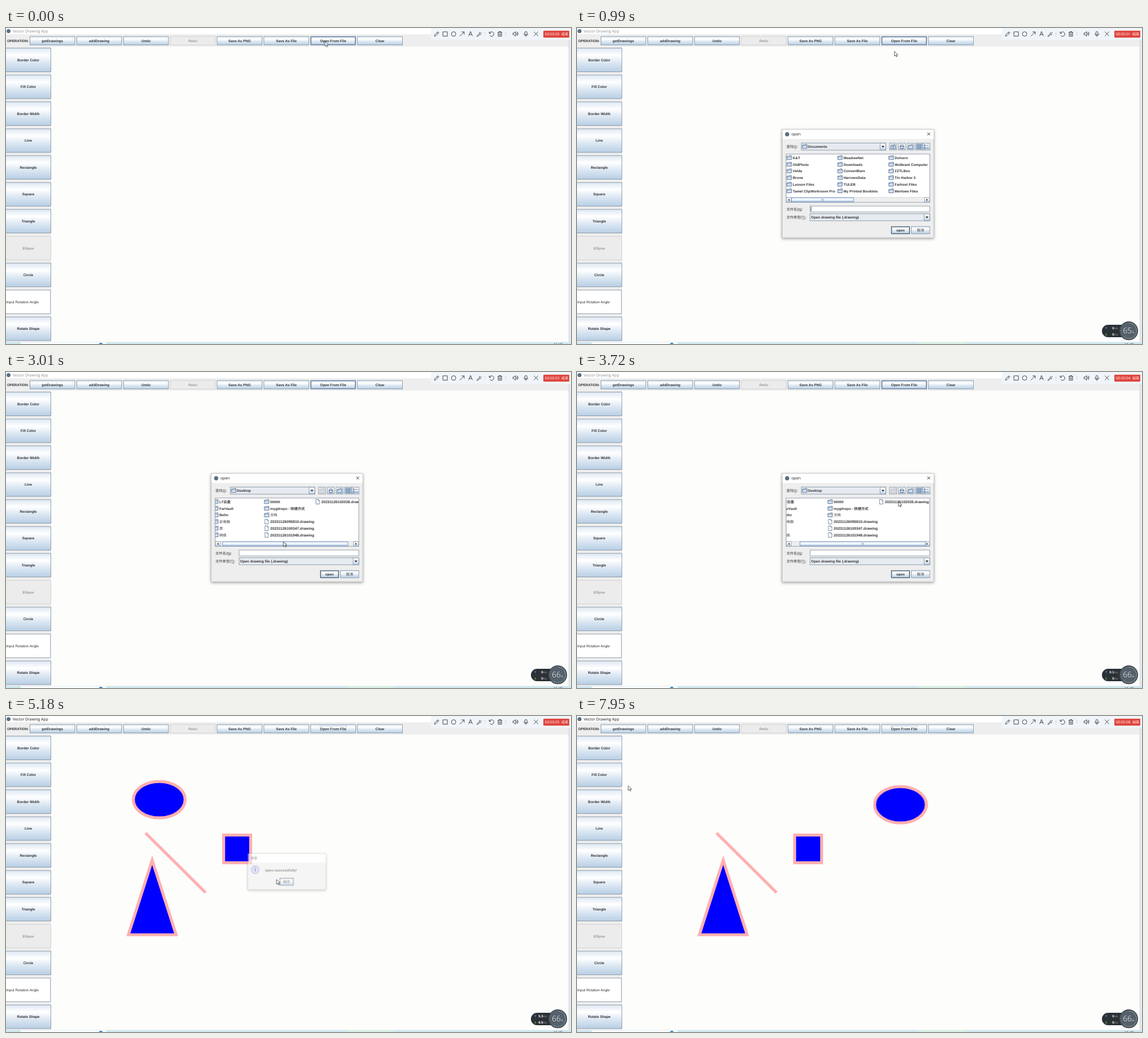
An HTML page that plays this animation: 1001x559 px, repeating every 8000 ms.

```html
<!DOCTYPE html>
<html lang="en">
<head>
<meta charset="utf-8">
<title>Vector Drawing App</title>
<style>
  html, body { margin: 0; width: 100%; height: 100%; overflow: hidden; background: #fdfdfc; }
  #stage { display: block; width: 1001px; height: 559px; }
  text { font-family: 'Liberation Sans', 'Noto Sans CJK SC', 'Noto Sans CJK', sans-serif; text-rendering: geometricPrecision; white-space: pre; }
  .system { font-family: 'Open Sans', 'Noto Sans CJK SC', 'Noto Sans CJK', sans-serif; }
</style>
</head>
<body>
<svg id="stage" viewBox="0 0 1001 559" xmlns="http://www.w3.org/2000/svg">
  <defs>
    <linearGradient id="ocean" x2="0" y2="1">
      <stop offset="0" stop-color="#dde8f3"/><stop offset=".3" stop-color="#fff"/>
      <stop offset=".6" stop-color="#dde8f3"/><stop offset="1" stop-color="#b8cfe5"/>
    </linearGradient>
    <filter id="shadow" x="-10%" y="-10%" width="120%" height="125%">
      <feDropShadow dx="0" dy="1.5" stdDeviation="2.6" flood-color="#000" flood-opacity=".4"/>
    </filter>
  </defs>
</svg>
<script>
const LOOP = 8000;
const stage = document.getElementById('stage');
const OCEAN = 'url(#ocean)', EDGE = '#7a8a99', INK = '#333', PANEL = '#eee', SELECT = '#b8cfe5';

function add(parent, tag, attrs, content) {
  const node = document.createElementNS('http://www.w3.org/2000/svg', tag);
  for (const key in attrs) node.setAttribute(key, attrs[key]);
  if (content !== undefined) node.textContent = content;
  parent.append(node);
  return node;
}
const group = parent => add(parent, 'g', {});
const box = (parent, x, y, width, height, fill, stroke = 'none', extra = {}) =>
  add(parent, 'rect', { x, y, width, height, fill, stroke, 'stroke-width': .8, ...extra });
const path = (parent, d, stroke = INK, extra = {}) =>
  add(parent, 'path', { d, stroke, fill: 'none', 'stroke-width': .9, ...extra });
const dot = (parent, cx, cy, r, fill, extra = {}) => add(parent, 'circle', { cx, cy, r, fill, ...extra });
const label = (parent, x, y, content, extra = {}) =>
  add(parent, 'text', { x, y, 'font-size': 6.3, 'font-weight': 700, fill: INK, ...extra }, content);
const plain = (parent, x, y, content, extra = {}) =>
  label(parent, x, y, content, { 'font-weight': 400, ...extra });
const system = (parent, x, y, content, extra = {}) =>
  plain(parent, x, y, content, { class: 'system', 'font-size': 6.8, ...extra });

// steps: [ms, value] pairs, the first at 0; the last value holds to the loop's end.
function play(node, property, steps, easing = 'step-end') {
  const frames = steps.map(([ms, value]) => ({ offset: ms / LOOP, [property]: value, easing }));
  frames.push({ offset: 1, [property]: steps.at(-1)[1] });
  node.animate(frames, { duration: LOOP, iterations: Infinity });
  return node;
}
const show = (node, from, to = LOOP) =>
  play(node, 'opacity', [...(from ? [[0, 0]] : []), [from, 1], ...(to < LOOP ? [[to, 0]] : [])]);
const move = (node, steps) =>
  play(node, 'transform', steps.map(([ms, x, y = 0]) => [ms, `translate(${x}px,${y}px)`]), 'linear');
// values: [ms, content] pairs, each shown until the next one starts.
function swap(values, draw) {
  values.forEach(([ms, content], i) => show(draw(content), ms, values[i + 1]?.[0]));
}

function button(parent, x, y, w, h, content, { disabled, ...extra } = {}) {
  box(parent, x, y, w, h, disabled ? '#ececec' : OCEAN, disabled ? '#b4b4b4' : EDGE,
    disabled ? { 'stroke-dasharray': '1 .6' } : {});
  label(parent, x + w / 2, y + h / 2 + 2.2, content,
    { 'text-anchor': 'middle', fill: disabled ? '#999' : INK, ...extra });
}
function folder(parent, x, y) {
  path(parent, `M${x} ${y + 6.5}v-6h3l1-1h4v7z`, '#52698c', { fill: '#d5e2f1' });
  path(parent, `M${x} ${y + 1.7}h8`, '#52698c', { 'stroke-width': .6 });
}
function sheet(parent, x, y) {
  path(parent, `M${x + 1} ${y - 1}h4l2 2v6.3h-6zM${x + 5} ${y - 1}v2h2`, '#52698c', { fill: '#fff', 'stroke-width': .8 });
}

function drawWindow() {
  box(stage, 0, 0, 1001, 559, '#fdfdfc');
  box(stage, 0, 0, 1001, 11, '#fff');
  box(stage, 0, 11, 1001, 22, PANEL);
  box(stage, 0, 33, 80, 523, PANEL);
  box(stage, 997, 21, 4, 535, '#e9edf0');
  path(stage, 'M997.5 21V556', '#b9c6d2', { 'stroke-width': .7 });
  dot(stage, 4.5, 5.5, 3.5, '#5a6f86');
  swap([[0, '#8c8c8c'], [5130, '#111']], fill => system(stage, 12, 8.2, 'Vector Drawing App', { fill }));

  label(stage, 2, 25, 'OPERATION:', { 'font-size': 6.2 });
  ['getDrawings', 'addDrawing', 'Undo', 'Redo', 'Save As PNG', 'Save As File', 'Open From File', 'Clear']
    .forEach((name, i) => button(stage, 42.4 + i * 82.9, 15, 79.6, 15, name, { disabled: name === 'Redo' }));
  show(box(stage, 540.4, 15.6, 78.4, 13.8, 'none', '#6c87ad', { 'stroke-width': 1.4 }), 0, 5130);
  show(box(stage, 556.5, 17.5, 46.5, 9.5, 'none', '#a3b8cc', { 'stroke-width': .6 }), 5130);

  ['Border Color', 'Fill Color', 'Border Width', 'Line', 'Rectangle', 'Square', 'Triangle', 'Ellipse', 'Circle', '', 'Rotate Shape']
    .forEach((name, i) => {
      const y = 35.6 + i * 47.55;
      if (name) return button(stage, -.5, y, 80, 41.8, name, { disabled: name === 'Ellipse' });
      box(stage, -.5, y, 79.3, 41.8, '#fff', EDGE);
      plain(stage, .5, y + 23.2, 'Input Rotation Angle', { 'font-size': 6.4 });
    });

  box(stage, 0, 555.5, 1001, 3.5, '#cfe7ee');
  box(stage, 26, 556, 152, 3, '#fbfdfd');
  show(box(stage, 604, 556, 85, 3, '#d6efe3'), 400);
  dot(stage, 168, 560, 3.2, '#2b86d9');
  system(stage, 970, 562, '11:45', { 'font-size': 6.5 });
}

function drawShapes() {
  const shapes = add(stage, 'g', { fill: '#00f', stroke: '#ffafaf', 'stroke-width': 5.2 });
  add(shapes, 'path', { d: 'M247.2 207 353.5 312.3', fill: 'none' });
  add(shapes, 'rect', { x: 385.6, y: 210.6, width: 47.8, height: 49 });
  add(shapes, 'path', { d: 'M259 255 301.4 387H216.8z' });
  const ellipse = add(shapes, 'ellipse', { cx: 271.5, cy: 148, rx: 45.8, ry: 32.2 });
  move(ellipse, [[0, 0, 0], [5750, 0, 0], [6250, 301.5, 9]]);
  show(shapes, 4190);
}

function drawRecorder() {
  box(stage, 753, 0, 248, 21, '#f0f5fa');
  [
    'M759 14.5l.7-2.6 5.4-5.2 1.8 1.8-5.3 5.3zM763.8 8l1.8 1.8',
    'M774 6.8h8v7.6h-8z',
    'M804 14.5l7.6-7.6M807 6.9h4.7v4.7',
    'M819.6 14.2l3.4-8 3.4 8M820.8 11.4h4.4',
    'M834 14.4l4.8-4.8 1.2 1.2-4.8 4.4zM838.5 7l1 2M842.5 8l-2 1.2M842 12l-1.6-.6',
    'M856.2 6.5v3h3M856.6 9.3a4 4 0 1 1 .6 4',
    'M871 7.8h8M873.4 7.6V6.3h3.2v1.3M872 8v6.6h6V8M874 9.7v3.4M876 9.7v3.4',
    'M898.3 8.8h2l2.6-2.4v8l-2.6-2.4h-2zM904.6 8.3q1.5 2 0 4M906 6.8q2.7 3.5 0 7',
    'M919.3 8a1.8 1.8 0 0 1 3.6 0v2.3a1.8 1.8 0 0 1-3.6 0zM917.5 10.2q.5 3.2 3.6 3.2t3.6-3.2M921.1 13.4v2',
    'M935.2 6.6l7.6 7.6M942.8 6.6l-7.6 7.6'
  ].forEach(d => path(stage, d));
  dot(stage, 793, 10.6, 4, 'none', { stroke: INK, 'stroke-width': .9 });
  path(stage, 'M848.5 7v7M885.5 7v7', '#c3ccd4', { 'stroke-width': .7 });

  box(stage, 952, 4.8, 46, 12.2, '#df453d', 'none', { rx: 1.5 });
  const seconds = Array.from({ length: 9 }, (_, s) => [s && s * 1000 - 670, `00:00:0${s}`]);
  swap(seconds, time => system(stage, 954.7, 13.2, time, { fill: '#fff', 'font-size': 6.5 }));
  system(stage, 984, 13.2, '结束', { fill: '#fff', 'font-size': 6.1 });
}

function drawSpeedBall() {
  const ball = group(stage);
  box(ball, 930, 525, 50, 22, '#2c3136', 'none', { rx: 11 });
  path(ball, 'M937.5 533v-4M936 530.5l1.5-1.5 1.5 1.5', '#4a9be0', { 'stroke-width': .8 });
  path(ball, 'M937.5 540v4M936 542.5l1.5 1.5 1.5-1.5', '#55b96a', { 'stroke-width': .8 });
  const rate = (y, values) => {
    swap(values, value => label(ball, 951.6, y, value, { fill: '#fff', 'font-size': 6, 'text-anchor': 'end' }));
    plain(ball, 952, y, 'K/s', { fill: '#a5abb0', 'font-size': 4.6 });
  };
  rate(532.6, [[0, '0'], [3450, '0.1'], [4450, '5.3'], [5450, '0.9'], [7450, '0']]);
  rate(544.2, [[0, '0'], [4450, '6.6'], [5450, '1'], [7450, '0']]);
  dot(ball, 977.5, 535.7, 16, '#55606b', { stroke: '#3f474e', 'stroke-width': 1.2 });
  path(ball, 'M977.5 522a13.7 13.7 0 1 1-9 24', '#7f9a92', { 'stroke-width': 1 });
  swap([[0, '65'], [1450, '66']], value =>
    system(ball, 967.3, 540.4, value, { fill: '#fff', 'font-size': 13.6, 'font-weight': 300 }));
  system(ball, 983.3, 540.4, '%', { fill: '#dde2e6', 'font-size': 4.8 });
  show(ball, 450);
}

function drawFrame(parent, x, y, w, h, barHeight) {
  box(parent, x, y, w, h, PANEL, '#a9a9a9', { filter: 'url(#shadow)', 'stroke-width': .6 });
  box(parent, x + .3, y + .3, w - .6, barHeight, '#fff');
}
function dropArrow(parent, x, y, h) {
  box(parent, x, y, 10, h, OCEAN, EDGE);
  path(parent, `M${x + 2.3} ${y + h / 2 - 1.3}h5.4l-2.7 3z`, 'none', { fill: '#222' });
}

// Columns of six rows; names ending in ".drawing" get a sheet icon.
function fileGrid(parent, names) {
  const grid = group(parent);
  names.forEach((name, i) => {
    const x = [372, 462, 552.5][Math.floor(i / 6)], y = 226.3 + (i % 6) * 11.75;
    const isDrawing = name.endsWith('.drawing');
    (isDrawing ? sheet : folder)(grid, x, y);
    const cjkOnly = /^[^\x00-\x7f]+$/.test(name);
    label(grid, x + 10.3, y + 5.6, name, { 'font-size': isDrawing ? 6.6 : 6.3, 'font-weight': cjkOnly ? 400 : 700 });
  });
  return grid;
}

function drawChooser() {
  const OPENED = 500, DESKTOP = 2450, PICKED = 3810;
  const dialog = group(stage);
  drawFrame(dialog, 363.5, 179.5, 268.5, 191.5, 16.5);
  dot(dialog, 372.3, 188, 3.7, '#5a6f86');
  system(dialog, 380, 190.3, 'open', { fill: '#111' });
  path(dialog, 'M620.6 185l5 5M625.6 185l-5 5', '#222');

  plain(dialog, 371, 212.3, '查找(I):');
  box(dialog, 397.5, 203.5, 149.5, 12.5, '#e6ebf1', EDGE);
  folder(dialog, 399.3, 206.5);
  dropArrow(dialog, 537, 203.5, 12.5);
  swap([[0, 'Documents'], [DESKTOP, 'Desktop']], name => label(dialog, 409, 212.2, name));

  const tool = (x, w, fill) => box(dialog, x, 203.8, w, 12, fill, EDGE);
  [553.7, 569.3, 584.8].forEach(x => tool(x, 12.4, OCEAN));
  show(tool(569.3, 12.4, '#a9c2dd'), 2150, 2700);
  tool(600, 12.4, SELECT);
  tool(612.8, 12.4, OCEAN);
  folder(dialog, 556, 206.8);
  path(dialog, 'M560 212.5v-3M558.8 210.4l1.2-1.2 1.2 1.2', INK, { 'stroke-width': .6 });
  path(dialog, 'M572 209.5l1-2.4h5l1 2.4zM573 209.5v4h5v-4', '#3e5a80');
  folder(dialog, 587, 206.8);
  path(dialog, 'M602.5 206.5h3v2.6h-3zM607 206.5h3v2.6h-3zM602.5 211h3v2.6h-3zM607 211h3v2.6h-3z', '#3e5a80', { 'stroke-width': .7 });
  path(dialog, 'M615 206.5h2v2.4h-2zM615 211h2v2.4h-2zM618.5 207.8h5M618.5 212.3h5', '#3e5a80', { 'stroke-width': .8 });
  show(box(dialog, 553.7, 203.8, 12.4, 12, '#e4e4e4', '#aaa', { 'fill-opacity': .7 }), DESKTOP);

  box(dialog, 370.5, 223, 254.5, 85.3, '#fff', EDGE);
  const list = add(dialog, 'svg', { x: 371, y: 223.5, width: 253.5, height: 76, viewBox: '371 223.5 253.5 76' });
  show(fileGrid(list, [
    'K&T', 'OldPhoto', 'Velda', 'Brone', 'Lesson Files', 'Tamel ClipWorkroom Pro',
    'MeadowNet', 'Downloads', 'ConvertBarn', 'HarrowsData', 'TULEB', 'My Printed Booklets',
    'Dolvern', 'Wolbrant Computer', 'ZZTLBox', 'Tin Harbor 3', 'Farhost Files', 'Merlowe Files'
  ]), 0, DESKTOP);

  const desktop = group(list), scrolled = group(desktop);
  show(box(scrolled, 561.8, 224.3, 85, 11, SELECT), PICKED);
  fileGrid(scrolled, [
    'LT云盘', 'FarVault', 'Belto', '此电脑', '库', '网络',
    '00000', 'mygitrepo - 快捷方式', '文档', '20231126095810.drawing', '20231126100347.drawing', '20231126101948.drawing',
    '20231126102028.drawing'
  ]);
  move(scrolled, [[0, 0], [2950, 0], [3200, -17.5]]);
  show(desktop, DESKTOP);

  box(dialog, 370.9, 299.8, 253.7, 8.2, '#eee', '#b9c3cd', { 'stroke-width': .6 });
  box(dialog, 371, 300, 8.5, 8, OCEAN, EDGE, { 'stroke-width': .6 });
  box(dialog, 615.8, 300, 8.5, 8, OCEAN, EDGE, { 'stroke-width': .6 });
  path(dialog, 'M376.5 302v4l-2.4-2zM619 302v4l2.4-2z', 'none', { fill: '#222' });
  const thumb = width => {
    const node = group(dialog), mid = 380 + width / 2;
    box(node, 380, 300.2, width, 7.5, OCEAN, '#6382bf');
    path(node, `M${mid - 1.5} 302.3v3.5M${mid} 302.3v3.5M${mid + 1.5} 302.3v3.5`, '#6382bf', { 'stroke-width': .6 });
    return node;
  };
  show(thumb(110), 0, DESKTOP);
  const wide = group(dialog);
  move(wide.appendChild(thumb(222)), [[0, 0], [2950, 0], [3200, 15]]);
  show(wide, DESKTOP);

  plain(dialog, 371, 322.6, '文件名(N):');
  plain(dialog, 371, 337.3, '文件类型(T):');
  path(dialog, 'M393 323.6h4.5M399.5 338.3h4.5M386 213.3h2', INK, { 'stroke-width': .5 });
  box(dialog, 413, 315, 212, 10.3, '#fff', EDGE);
  play(path(dialog, 'M414.7 316.2v8', '#222', { 'stroke-width': .8 }), 'opacity', [[0, 1], [1050, 0], [1550, 1], [2050, 0]]);
  show(plain(dialog, 415, 322.5, '20231126102028.drawing'), PICKED);
  box(dialog, 413, 328.4, 212, 12.6, '#e6ebf1', EDGE);
  label(dialog, 414.8, 337.1, 'Open drawing file (.drawing)');
  dropArrow(dialog, 615, 328.4, 12.6);
  button(dialog, 557, 351.2, 32.4, 12.8, 'open');
  box(dialog, 557.4, 351.6, 31.6, 12, 'none', '#54677c', { 'stroke-width': 1.3 });
  button(dialog, 592.5, 351.2, 32.5, 12.8, '取消', { 'font-weight': 400 });

  play(dialog, 'opacity', [[0, 0], [OPENED, 0], [OPENED + 140, 1], [4050, 1], [4180, 0]], 'linear');
}

function drawMessage() {
  const dialog = group(stage);
  drawFrame(dialog, 428.7, 243.5, 138, 63.5, 15.5);
  plain(dialog, 433, 253.6, '消息', { 'font-size': 6.2 });
  dot(dialog, 441.5, 271.8, 7, '#c9c9f2', { stroke: '#6a6ab0', 'stroke-width': .9 });
  label(dialog, 441.5, 275.3, 'i', { 'font-size': 10, 'text-anchor': 'middle', fill: '#3c3c8c' });
  label(dialog, 458.8, 275.2, 'open successfully!', { 'font-size': 6.3 });
  button(dialog, 485, 286.8, 24.3, 12.6, '确定', { 'font-weight': 400 });
  box(dialog, 485.4, 287.2, 23.5, 11.8, 'none', '#54677c', { 'stroke-width': 1.2 });
  dialog.style.transformOrigin = '497.5px 275px';
  play(dialog, 'opacity', [[0, 0], [4250, 0], [4380, 1], [5120, 1], [5245, 0]], 'linear');
  play(dialog, 'transform', [[0, 'scale(1.03)'], [5120, 'scale(1.03)'], [5245, 'scale(.97)']], 'linear');
}

function drawCursor() {
  const cursor = path(stage, 'M.4.4v8.3l2-1.8 1.4 3 1.4-.6-1.3-2.9h2.7z', '#222', { fill: '#fff', 'stroke-width': .7 });
  move(cursor, [
    [0, 564.5, 23.5], [240, 564.5, 23.5], [700, 562, 41], [1080, 562, 41], [1900, 574, 212],
    [2310, 570.8, 217.5], [2730, 486, 300], [2920, 486, 300], [3200, 501, 300], [3680, 569, 229],
    [4250, 569, 229], [4850, 490, 291], [5100, 490, 291], [5180, 479.3, 289.2], [5650, 273, 150.5],
    [5750, 273, 150.5], [6250, 574.8, 159.3], [6370, 574.8, 159.3], [6540, 546, 163], [7060, 394, 243],
    [7200, 394, 243], [7600, 411, 243], [7710, 411, 243], [7950, 90.3, 123]
  ]);
}

drawWindow();
drawShapes();
drawChooser();
drawMessage();
drawRecorder();
drawSpeedBall();
drawCursor();
</script>
</body>
</html>
```
